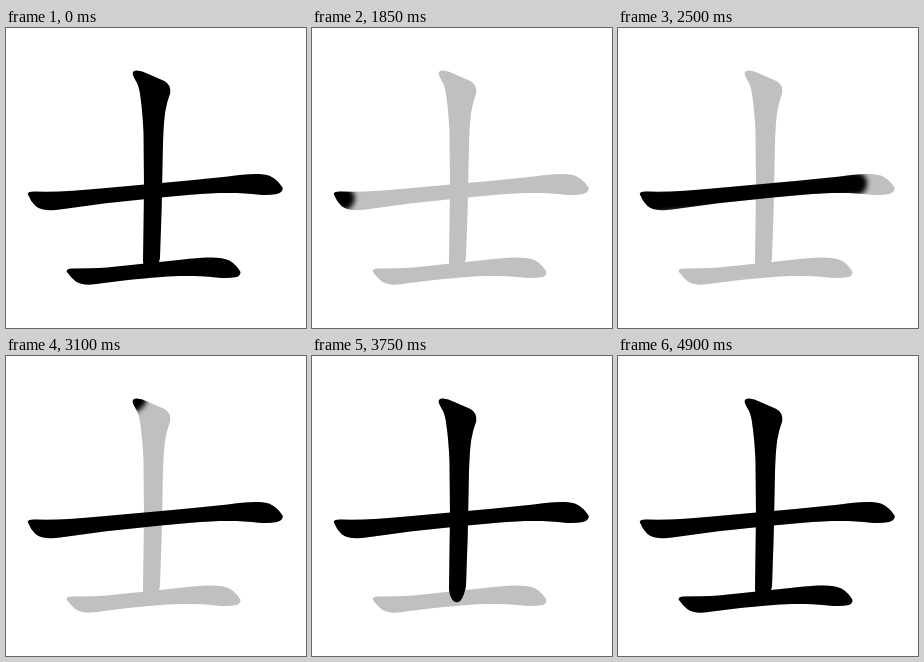
An HTML page with a canvas for the animation above (5900 ms loop, 300 px wide and 300 px high).

```html
<!DOCTYPE html>
<html lang="en">
<head>
<meta charset="utf-8">
<title>Stroke order</title>
<style>
html, body { margin: 0; width: 100%; height: 100%; overflow: hidden; background: #fff; }
canvas { display: block; width: 300px; height: 300px; }
</style>
</head>
<body>
<canvas id="stage" width="300" height="300"></canvas>
<script>
const ctx = document.getElementById('stage').getContext('2d');
const LOOP = 5900, REVEAL = 1000, GREY = '#c0c0c0', BLUR = 5, AWAY = 600;

// spine: brush path; steps: [time, distance along the spine], no distance = whole stroke.
const strokes = [
  {
    shape: new Path2D('M21.7 166Q22.5 163.3 29 163.6L40 163.8Q64 163.5 100 160L180 152.7L222 148.6C238 146 256 145 263.5 147.8Q271.5 151.5 276.8 160Q276.8 164.6 271 165.9Q263 167.6 253 166.8C235 164.3 210 164.5 185 166.8L155 169.5L100 175.2L54 181.6C43 183.4 34.5 182 29.5 178Q24.5 173.3 21.7 166Z'),
    spine: new Path2D('M14 158L34 173L300 150'),
    width: 24,
    steps: [
      [1750, 10], [1850, 21],
      [2000, 58], [2100, 89], [2200, 123], [2300, 158], [2400, 194], [2500, 229], [2600]
    ]
  },
  {
    shape: new Path2D('M126.6 46Q126.6 42.6 131 42.6Q136 43 142.3 46L158.4 53Q165.4 57 164.2 65.2Q160.8 74 159.2 84Q157.2 98 156.8 125L155.7 180L154 230Q152 240.5 148.5 244.8Q145 247.8 141.5 245Q137.5 241 137 233L138 160L137.5 105Q136.5 83 134.4 69Q133.4 60 131 55Q127.5 49 126.6 46Z'),
    spine: new Path2D('M116.3 32.3L148 64L146 300'),
    width: 36,
    steps: [
      [3100, 10], [3200, 45],
      [3350, 77], [3450, 112], [3550, 147], [3650, 181], [3750]
    ]
  },
  {
    shape: new Path2D('M60.6 243.5Q60.6 240.3 66 240.4L84 240.2Q100 239.8 120 237.4L170 232.2Q184 230.5 196 229.8C208 228.9 217.5 229.5 223.4 232.4Q230.5 236.6 234.5 244Q234.5 248.5 229.3 249.3Q222 250.6 210 249.4C190 247.7 172 247.8 156 249Q135 250.5 118 252.6L94 255.6C83 257.4 74.5 257 69.5 253.2Q64.5 249.3 60.6 243.5Z'),
    spine: new Path2D('M53 234L73 249Q130 241 190 239L260 243'),
    width: 24,
    steps: [
      [4250, 8], [4350, 20],
      [4500, 61], [4600, 90], [4700, 119], [4800, 149], [4900]
    ]
  }
];

function fill(style, shape) {
  ctx.fillStyle = style;
  ctx.fill(shape);
}

// Soft brush: the line itself lies off the stage, only its blurred shadow shows.
function brush({ shape, spine, width }, dist) {
  ctx.save();
  ctx.clip(shape);
  ctx.translate(-AWAY, 0);
  ctx.shadowColor = '#000';
  ctx.shadowBlur = BLUR;
  ctx.shadowOffsetX = AWAY;
  ctx.lineWidth = width;
  ctx.lineCap = ctx.lineJoin = 'round';
  ctx.setLineDash([dist, 999]);
  ctx.stroke(spine);
  ctx.restore();
}

function draw(t) {
  ctx.fillStyle = '#fff';
  ctx.fillRect(0, 0, 300, 300);
  const whole = t < REVEAL;
  if (!whole) strokes.forEach(s => fill(GREY, s.shape));
  for (const s of strokes) {
    const step = whole ? [0] : s.steps.filter(k => k[0] <= t).pop();
    if (!step) continue;
    if (step.length > 1) brush(s, step[1]);
    else fill('#000', s.shape);
  }
}

const start = performance.now();
function tick() {
  draw((performance.now() - start) % LOOP);
  requestAnimationFrame(tick);
}
tick();
</script>
</body>
</html>
```
